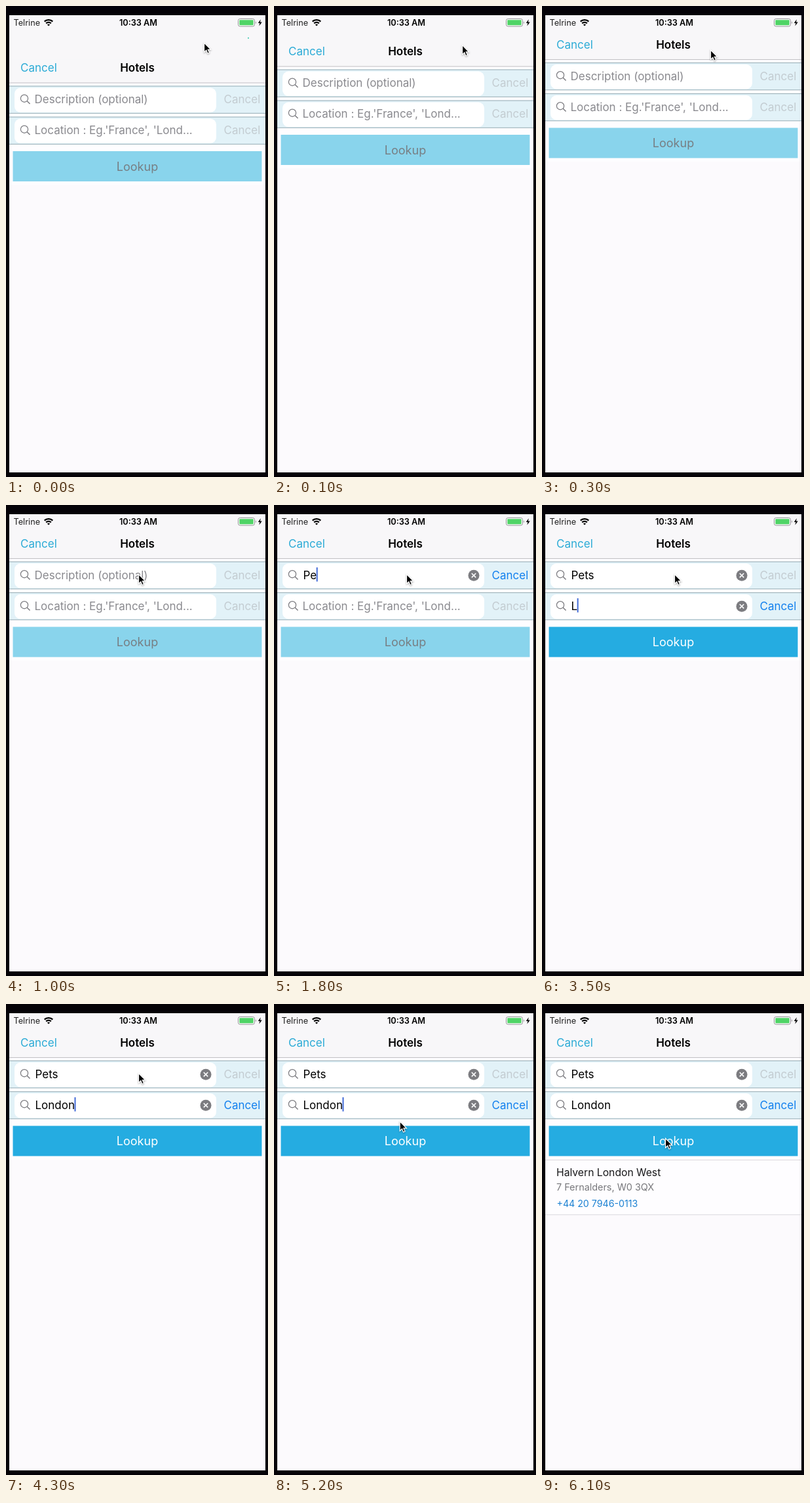
An HTML page that plays this animation: 400 px wide and 717 px high, repeating every 6200 ms.

```html
<!DOCTYPE html>
<html lang="en">
<head>
<meta charset="utf-8">
<title>Hotel lookup</title>
<style>
  html, body { margin: 0; width: 100%; height: 100%; overflow: hidden; background: #050307; }
  svg { display: block; width: 400px; height: 717px; }
  text { font: 17px Inter, Roboto, sans-serif; white-space: pre; }
  .bold { font-weight: 600; }
  .status { font-size: 12.7px; }
  .hint { fill: #8a8a8f; }
</style>
</head>
<body>
<svg viewBox="0 0 400 717">
  <defs>
    <g id="bar">
      <path d="M5 86h391v42H5z" fill="#e2f2f8"/>
      <path d="M5 86.5h391M5 127.8h391" stroke="#97adb5"/>
      <rect x="13" y="89" width="308" height="37.5" rx="9" fill="#fff"/>
      <path d="M32.2 109.2l4.3 4.3" stroke="#77777c" stroke-width="1.4"/>
      <circle cx="28" cy="105.2" r="5.6" fill="none" stroke="#77777c" stroke-width="1.2"/>
    </g>
    <g id="clear">
      <circle cx="305" cy="107.2" r="8.5" fill="#7c7c80"/>
      <path d="M301.8 104l6.4 6.4m0-6.4l-6.4 6.4" stroke="#fff" stroke-width="1.6"/>
    </g>
  </defs>

  <path d="M5 14h391v696H5z" fill="#fcfafd"/>
  <path d="M5 14h391v68H5z" fill="#f8f7f9"/>

  <g id="page">
    <path d="M5 46h391v36H5z" fill="#f8f7f9"/>
    <path d="M5 82h391v155H5z" fill="#fefdff"/>
    <path d="M5 81.5h391" stroke="#c2c0c4"/>
    <text x="22" y="64.7" fill="#2babd6">Cancel</text>
    <text x="200.5" y="64.7" class="bold" text-anchor="middle">Hotels</text>
    <g id="fields"></g>
    <path id="button" d="M10.5 185.5h380v46h-380z"/>
    <text id="lookup" x="200.5" y="215.3" text-anchor="middle" style="font-size:18px">Lookup</text>
    <g id="result">
      <path d="M5 237.5h391v83.5H5z" fill="#fefdff"/>
      <path d="M5 237.5h391M5 320.8h391" stroke="#dbd9dd"/>
      <text x="22" y="261.7" fill="#18181a" style="font-size:15.7px">Halvern London West</text>
      <text x="22" y="284.2" fill="#77777b" style="font-size:14.4px">7 Fernalders, W0 3QX</text>
      <text x="22.5" y="309" fill="#1b80d2" style="font-size:14.2px">+44 20 7946-0113</text>
    </g>
  </g>

  <text x="11.5" y="30" class="status" fill="#222">Telrine</text>
  <g fill="none" stroke="#000" stroke-width="2.3">
    <path d="M58.7 23.6a9 9 0 0 1 12.6 0M61.2 26.4a5.4 5.4 0 0 1 7.6 0"/>
    <path d="M65 30.6l-2-2.1a2.9 2.9 0 0 1 4 0z" fill="#000" stroke="none"/>
  </g>
  <text x="202" y="30" class="status bold" text-anchor="middle">10:33 AM</text>
  <rect x="354.5" y="19.5" width="25" height="11.5" rx="2.8" fill="#fff" stroke="#929295"/>
  <rect x="356.3" y="21.2" width="21.4" height="8.1" rx="1" fill="#4fd466"/>
  <path d="M381 23.3q2 2 0 4z" fill="#929295"/>
  <path d="M388.8 20.3l-4 5.6h2.6l-1 4.6 4.4-6h-2.8z"/>
  <circle id="dot" cx="370" cy="48.7" r="1" fill="#2cc7a8"/>

  <g id="pointer" style="filter:drop-shadow(0 1px 1px #0005)">
    <path d="M0 0V14.3L3.3 11.2 5.4 16.2 7.9 15.1 5.8 10.3H10.2Z" stroke="#fff" stroke-width="1.2"/>
  </g>
</svg>

<script>
const LOOP = 6200, STEP = 100;
const FIRST_FOCUS = 1200, SECOND_FOCUS = 2500, RESULT_AT = 5700;
const pointerPath = [[0, 302.5, 56], [300, 257.5, 67], [800, 202.5, 105.5],
                     [4800, 202.5, 105.5], [5400, 188.5, 204.5]];
const specs = [
  { y: 0, hint: "Description (optional)", word: "Pets",
    keys: [1500, 1700, 1900, 2000], focus: [FIRST_FOCUS, SECOND_FOCUS] },
  { y: 47, hint: "Location : Eg.'France', 'Lond...", word: "London",
    keys: [3400, 3700, 3800, 4000, 4100, 4200], focus: [SECOND_FOCUS, LOOP] }
];
const $ = id => document.getElementById(id);
const show = (node, on) => node.style.display = on ? "" : "none";

$("fields").innerHTML = specs.map(s => `
  <g transform="translate(0 ${s.y})">
    <use href="#bar"/>
    <text class="hint" x="43.5" y="112.8">${s.hint}</text>
    <text class="value" x="44.5" y="112.8"></text>
    <use class="clear" href="#clear"/>
    <rect class="caret" y="95" width="2" height="21.5" fill="#426bd8"/>
    <text class="cancel" x="332.5" y="112.8">Cancel</text>
  </g>`).join("");

const fields = specs.map((s, i) => {
  const root = $("fields").children[i];
  const part = name => root.querySelector("." + name);
  return { ...s, hintText: part("hint"), value: part("value"), clear: part("clear"),
           caret: part("caret"), cancel: part("cancel") };
});

function drawField(f, t) {
  const pressed = f.keys.filter(k => t >= k);
  const typed = f.word.slice(0, pressed.length);
  const focused = t >= f.focus[0] && t < f.focus[1];
  const lastAction = pressed.length ? pressed[pressed.length - 1] : f.focus[0];
  f.value.textContent = typed;
  show(f.hintText, !typed);
  show(f.clear, typed);
  show(f.caret, focused && (t - lastAction) % 1000 < 500);
  f.caret.setAttribute("x", typed ? 44 + f.value.getComputedTextLength() : 34.5);
  f.cancel.setAttribute("fill", focused ? "#1280ee" : "#c3ccd1");
}

function pointerAt(t) {
  const next = pointerPath.findIndex(p => p[0] > t);
  if (next < 0) return pointerPath[pointerPath.length - 1].slice(1);
  const [a, b] = [pointerPath[next - 1], pointerPath[next]];
  let u = (t - a[0]) / (b[0] - a[0]);
  if (next > 1) u = u * u * (3 - 2 * u);
  return [1, 2].map(i => a[i] + (b[i] - a[i]) * u);
}

function draw(t) {
  const shift = 35.5 * Math.max(0, 1 - t / 300) ** 3;
  $("page").setAttribute("transform", `translate(0 ${shift})`);
  fields.forEach(f => drawField(f, t));
  const ready = t >= fields[1].keys[0];
  $("button").setAttribute("fill", ready ? "#25ace1" : "#89d4ec");
  $("lookup").setAttribute("fill", ready ? "#fff" : "#777e83");
  show($("result"), t >= RESULT_AT);
  show($("dot"), t < STEP);
  $("pointer").setAttribute("transform", `translate(${pointerAt(t)})`);
}

const start = performance.now();
function tick() {
  const t = (performance.now() - start) % LOOP;
  draw(Math.floor(t / STEP) * STEP);
  requestAnimationFrame(tick);
}
tick();
</script>
</body>
</html>
```
